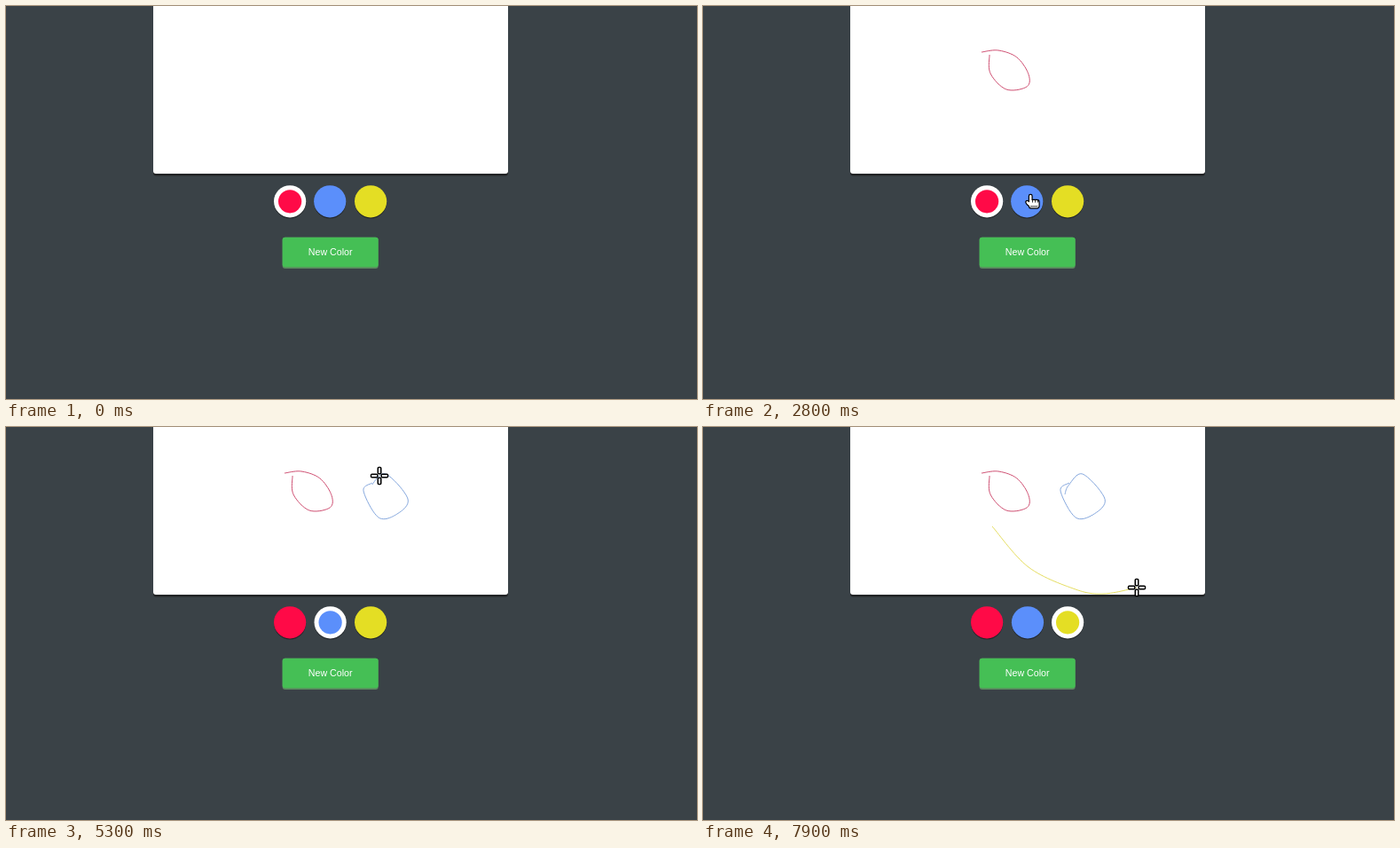
Animation, 779 px wide and 443 px high, one loop 8 s. Source, as an HTML page with a canvas:

```html
<!DOCTYPE html>
<html lang="en">
<head>
<meta charset="utf-8">
<title>Drawing app</title>
<style>
  html, body { margin: 0; width: 100%; height: 100%; overflow: hidden; background: #3a4247; }
  canvas { display: block; }
</style>
</head>
<body>
<canvas id="stage" width="779" height="443"></canvas>
<script>
const ctx = document.getElementById('stage').getContext('2d');
const LOOP = 8000, STEP = 100;
const SWATCHES = ['#ff0a47', '#5b8ffb', '#e4de24'];
const SWATCH_Y = 220.3, SWATCH_GAP = 45.5;

// Drawing gestures: smooth curves through a few key points.
const strokes = [
  { color: '#cf4f72', start: 700, end: 1900, points: [
    [323, 55], [324, 76], [342, 94], [365, 91], [367, 77], [354, 58], [333, 50], [314, 52]] },
  { color: '#86a8de', start: 4200, end: 5500, points: [
    [413, 63], [403, 72], [420, 102], [441, 98], [453, 81], [428, 53], [412, 66], [408, 76]] },
  { color: '#e6de62', start: 7300, end: 7900, points: [
    [326, 112], [367, 158], [420, 183], [452, 188], [489, 181]] }
];

// Pointer travel between gestures, each leg leaving from where the last move ended.
const travel = [
  { start: 300, end: 600, to: [323, 55] },
  { start: 2100, end: 2500, to: [380, 229] },
  { start: 2600, end: 2800, to: [369, 212] },
  { start: 3000, end: 3900, to: [413, 63] },
  { start: 5700, end: 6000, to: [380, 210] },
  { start: 6000, end: 6300, to: [414, 216] },
  { start: 6600, end: 7200, to: [326, 112] }
];
const moves = [...strokes, ...travel].sort((a, b) => a.start - b.start);

const lerp = (a, b, k) => a + (b - a) * k;
const smooth = k => k * k * (3 - 2 * k);
const progress = ({ start, end }, t) => Math.max(0, Math.min(1, (t - start) / (end - start)));
const trailing = k => k - .17 * Math.sin(Math.PI * k);
const swatchX = (i, selected) =>
  365.6 + (i - 1) * SWATCH_GAP + (i === 1 ? (selected - 1) * .4 : 0);

// Catmull-Rom position, k from 0 to 1
function curveAt(points, k) {
  const last = points.length - 1;
  const i = Math.min(last - 1, Math.floor(k * last));
  const u = k * last - i;
  const point = n => points[Math.max(0, Math.min(last, n))];
  return [0, 1].map(axis => {
    const [a, b, c, d] = [-1, 0, 1, 2].map(n => point(i + n)[axis]);
    return b + u / 2 * (c - a + u * (2 * a - 5 * b + 4 * c - d + u * (3 * (b - c) + d - a)));
  });
}

function pointerAt(t) {
  if (t < moves[0].start) return null;
  let at = [349, 22];
  for (const move of moves) {
    if (t < move.start) break;
    const k = progress(move, t);
    at = move.points
      ? curveAt(move.points, trailing(k))
      : at.map((v, axis) => lerp(v, move.to[axis], smooth(k)));
  }
  return at.map(Math.round);
}

function roundRect(x, y, w, h, r, fill) {
  ctx.fillStyle = fill;
  ctx.beginPath();
  ctx.roundRect(x, y, w, h, r);
  ctx.fill();
}

function disc(x, y, r, fill) {
  ctx.fillStyle = fill;
  ctx.beginPath();
  ctx.arc(x, y, r, 0, Math.PI * 2);
  ctx.fill();
}

function drawStroke(stroke, t) {
  const reach = progress(stroke, t);
  if (!reach) return;
  ctx.beginPath();
  for (let i = 0; i <= 60; i++) ctx.lineTo(...curveAt(stroke.points, reach * i / 60));
  ctx.strokeStyle = stroke.color;
  ctx.lineWidth = 1;
  ctx.stroke();
}

function drawSwatches(selected) {
  SWATCHES.forEach((color, i) => {
    const x = swatchX(i, selected);
    disc(x, SWATCH_Y + 1.3, 18, '#222629');
    disc(x, SWATCH_Y, 18.1, i === selected ? '#fff' : color);
    if (i === selected) disc(x, SWATCH_Y, 13.1, color);
  });
}

function drawButton() {
  roundRect(311.67, 260.67, 108, 35.33, 3, '#5a8a5f');
  roundRect(311.67, 260.67, 108, 33.67, 3, '#45bf55');
  ctx.fillStyle = '#fff';
  ctx.font = '10.67px "Liberation Sans", Arial, sans-serif';
  ctx.textAlign = 'center';
  ctx.fillText('New Color', 365.67, 281);
}

// Outline all parts first so that they merge into one silhouette.
function drawSilhouette(path) {
  ctx.lineWidth = 2.4;
  ctx.stroke(path);
  ctx.fill(path);
}

function drawCross() {
  ctx.lineWidth = 1.5;
  for (let i = 0; i < 4; i++) {
    ctx.beginPath();
    ctx.roundRect(-1.75, -9.5, 3.5, 7.3, 1);
    ctx.fill();
    ctx.stroke();
    ctx.rotate(Math.PI / 2);
  }
}

function drawHand() {
  const hand = new Path2D();
  hand.roundRect(-1, 1, 2.5, 10, 1.2);
  hand.roundRect(-1, 7, 10.5, 8.5, 2);
  hand.ellipse(-2, 10.5, 3.2, 1.5, .8, 0, Math.PI * 2);
  drawSilhouette(hand);
  ctx.fillStyle = '#000';
  for (let x = 2; x < 9; x += 3) ctx.fillRect(x, 7, .8, 2.5);
  ctx.fillRect(0, 13.5, 8.5, .8);
}

function drawArrow() {
  drawSilhouette(new Path2D('M1 2V16L4.4 12.8L7 19L8.8 18.2L6.2 12H10.8Z'));
}

function drawPointer(t, selected) {
  const at = pointerAt(t);
  if (!at) return;
  const [x, y] = at;
  const overSwatch = SWATCHES.some(
    (_, i) => Math.hypot(x - swatchX(i, selected), y - SWATCH_Y) < 17);
  ctx.save();
  ctx.translate(x, y);
  ctx.fillStyle = '#fff';
  ctx.strokeStyle = '#000';
  ctx.lineJoin = 'round';
  if (y < 189) drawCross();
  else if (overSwatch) drawHand();
  else drawArrow();
  ctx.restore();
}

function draw(now) {
  const t = Math.floor(now % LOOP / STEP) * STEP;
  const selected = t < 2900 ? 0 : t < 6500 ? 1 : 2;
  ctx.fillStyle = '#3a4247';
  ctx.fillRect(0, 0, 779, 443);
  roundRect(166, -10, 400, 201.5, 3, '#222426');
  roundRect(166, -10, 400, 199, 3, '#fff');
  strokes.forEach(stroke => drawStroke(stroke, t));
  drawSwatches(selected);
  drawButton();
  drawPointer(t, selected);
}

const began = performance.now();
function tick() {
  draw(performance.now() - began);
  requestAnimationFrame(tick);
}
tick();
</script>
</body>
</html>
```
